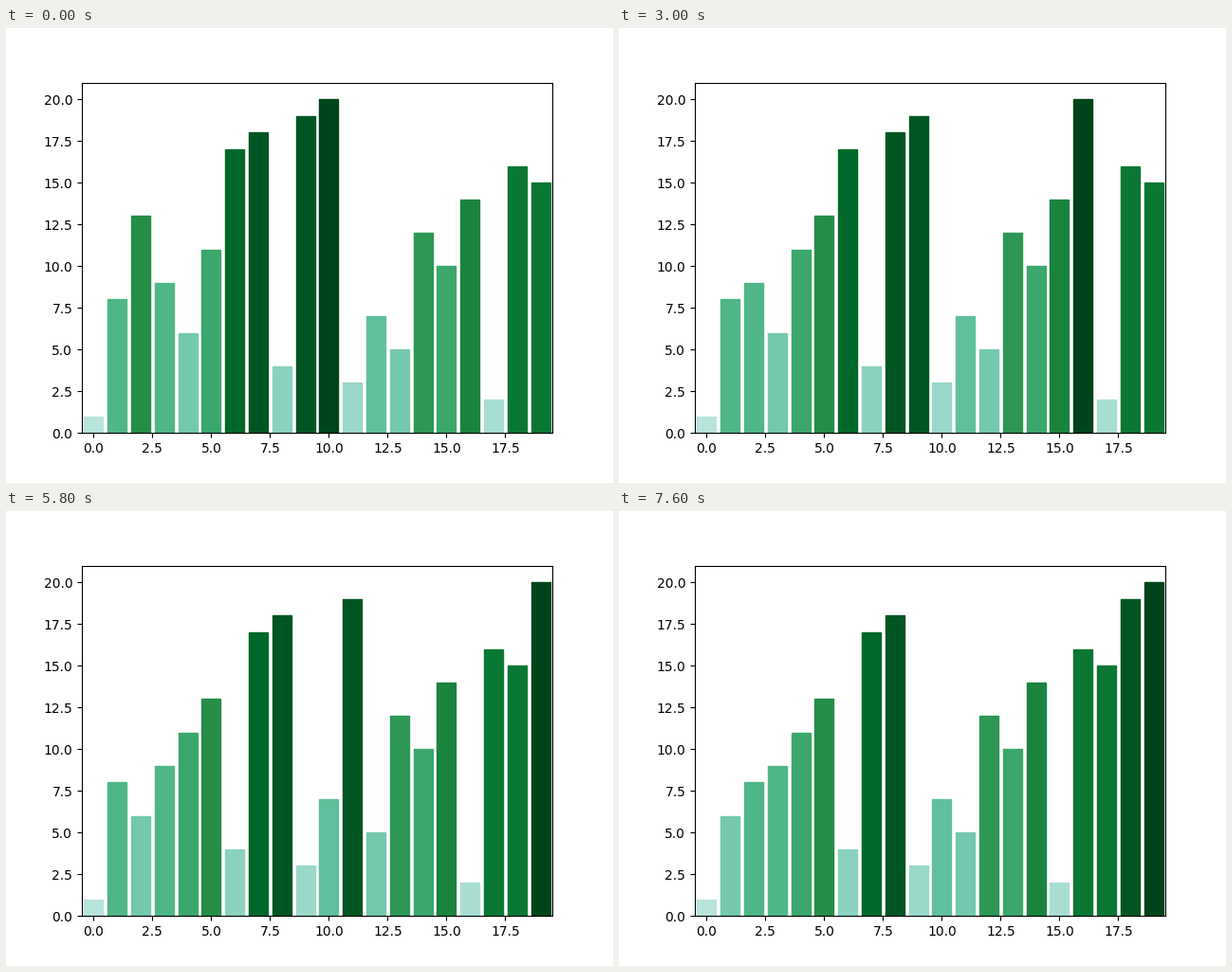
A matplotlib script for the animation above (8000 ms loop, 640x480 px).

```python
import matplotlib.pyplot as plt
from matplotlib.animation import FuncAnimation

FRAMES, STEP_MS = 40, 200
START = [1, 8, 13, 9, 6, 11, 17, 18, 4, 19, 20, 3, 7, 5, 12, 10, 14, 2, 16, 15]
SHARED = [(5, 6), (8, 9), (10, 11), (15, 16), (18, 19)]  # values with one shade


def bubble_states(values):
    """Yield the list after each comparison of a bubble sort."""
    values = list(values)
    for end in range(len(values) - 1, 0, -1):
        for j in range(end):
            if values[j] > values[j + 1]:
                values[j], values[j + 1] = values[j + 1], values[j]
            yield list(values)


def make_shades(count):
    level = {v: 0.3 + 0.7 * (v - 1) / (count - 1) for v in range(1, count + 1)}
    for a, b in SHARED:
        level[a] = level[b] = (level[a] + level[b]) / 2
    return {v: plt.cm.BuGn(x) for v, x in level.items()}


states = list(bubble_states(START))[:FRAMES]
shades = make_shades(len(START))

fig, ax = plt.subplots(figsize=(6.4, 4.8), dpi=100)
bars = ax.bar(range(len(START)), START)
ax.set_xlim(-0.5, len(START) - 0.5)
ax.set_ylim(0, 1.05 * max(START))


def update(i):
    for bar, value in zip(bars, states[i]):
        bar.set_height(value)
        bar.set_color(shades[value])
    return bars.patches


update(0)
anim = FuncAnimation(fig, update, frames=FRAMES, interval=STEP_MS,
                     repeat=True, repeat_delay=0, blit=False)
plt.show()
```
